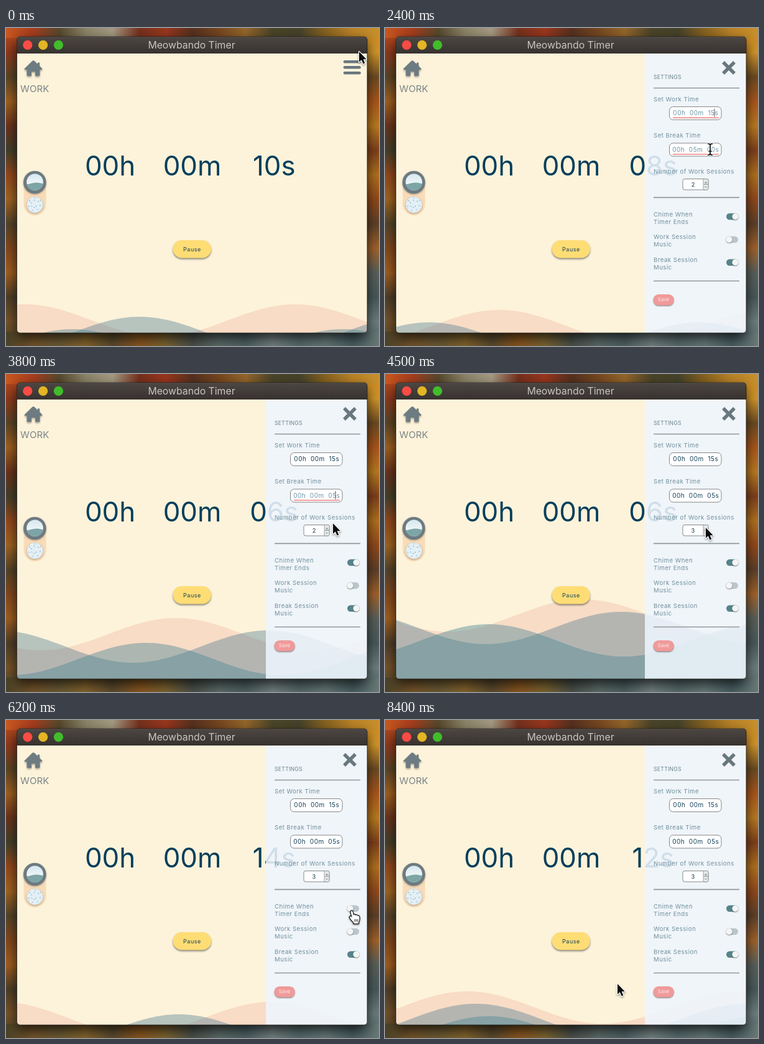
An HTML page with a canvas for the animation above (8500 ms loop, 600 by 511 pixels).

```html
<!DOCTYPE html>
<html lang="en">
<head>
<meta charset="utf-8">
<title>Meowbando Timer</title>
<style>
  html, body { margin: 0; width: 100%; height: 100%; overflow: hidden; background: #33302a; }
  canvas { display: block; width: 100vw; height: 100vh; }
</style>
</head>
<body>
<canvas id="stage" width="600" height="511"></canvas>
<script>
const LOOP = 8500, STEP = 100, TAU = Math.PI * 2;
const WIN = { x: 17.5, y: 14, w: 563.5, h: 476 };
const stage = document.getElementById('stage');
let g = stage.getContext('2d');

// ---------- helpers ----------
function box(x, y, w, h, r, fill, stroke, lineWidth = 1) {
  g.beginPath();
  g.roundRect(x, y, w, h, r);
  if (fill) { g.fillStyle = fill; g.fill(); }
  if (stroke) { g.strokeStyle = stroke; g.lineWidth = lineWidth; g.stroke(); }
}

function disc(x, y, r, fill) {
  g.beginPath();
  g.arc(x, y, r, 0, TAU);
  g.fillStyle = fill;
  g.fill();
}

function line(x1, y1, x2, y2, color, width, cap = 'butt') {
  g.beginPath();
  g.moveTo(x1, y1);
  g.lineTo(x2, y2);
  g.strokeStyle = color;
  g.lineWidth = width;
  g.lineCap = cap;
  g.stroke();
}

function text(str, x, y, size, color, { align = 'left', spacing = 0, weight = 400 } = {}) {
  g.font = `${weight} ${size}px Inter, sans-serif`;
  g.letterSpacing = spacing + 'px';
  g.textAlign = align;
  g.fillStyle = color;
  g.fillText(str, x, y);
}

function shadowed(color, blur, dy, draw) {
  g.save();
  g.shadowColor = color;
  g.shadowBlur = blur;
  g.shadowOffsetY = dy;
  draw();
  g.restore();
}

function gradient(x1, y1, x2, y2, colors) {
  const ramp = g.createLinearGradient(x1, y1, x2, y2);
  colors.forEach((color, i) => ramp.addColorStop(i / (colors.length - 1), color));
  return ramp;
}

// Interpolates rows of [time, ...values].
function track(keys, t, ease = k => k) {
  const i = keys.findIndex(k => k[0] > t);
  if (i < 0) return keys[keys.length - 1].slice(1);
  if (i === 0) return keys[0].slice(1);
  const a = keys[i - 1], b = keys[i];
  const k = ease((t - a[0]) / (b[0] - a[0]));
  return a.slice(1).map((v, n) => v + (b[n + 1] - v) * k);
}

// Latest value whose start time has passed.
const pick = (rows, t) => rows.filter(r => r[0] <= t).pop()[1];
const smooth = k => k * k * (3 - 2 * k);
const clamp = v => Math.max(0, Math.min(1, v));

// ---------- timeline (seconds) ----------
const SECONDS = [[0, '10s'], [.6, '09s'], [1.6, '08s'], [2.6, '07s'], [3.6, '06s'],
  [4.6, '05s'], [4.9, '15s'], [5.6, '14s'], [6.6, '13s'], [7.6, '12s']];
const LEVEL = [[0, 444], [.5, 470], [.9, 479], [1.5, 490], [2.4, 453], [3.8, 392], [4.9, 345],
  [5.3, 357], [6.2, 453], [6.6, 478], [7.4, 468], [8.4, 436], [8.5, 434]];
const FRONT_CREST = [[0, 542], [3.8, 225], [5.3, 100], [8.5, -280]];
const POINTER = [[0, 568, 38], [.2, 557, 62], [.4, 557, 62], [.8, 520, 143], [1.9, 520, 143],
  [2.3, 523, 195], [3.4, 526, 195], [3.8, 526, 240], [4.2, 516, 247], [4.6, 516, 247],
  [5.2, 555, 308], [6.2, 556, 307], [7.4, 556, 307], [8.3, 374, 424]];
const POINTER_KIND = [[0, 'arrow'], [.2, 'hand'], [.6, 'beam'], [3.6, 'arrow'], [5.1, 'hand'], [7.6, 'arrow']];
const OPEN_AT = .3;

// ---------- backdrop ----------
function paintBackdrop() {
  const layer = document.createElement('canvas');
  layer.width = 600;
  layer.height = 511;
  g = layer.getContext('2d');
  const strip = (x, y, w, h, colors) => {
    g.fillStyle = gradient(x, y, w > h ? x + w : x, w > h ? y : y + h, colors.split(' '));
    g.fillRect(x, y, w, h);
  };
  strip(0, 0, 300, 511, '#c04c1c #8f3a1c #5a4526 #a0601f #6a341c #44402a #94481c #a06420 #54442a #84481c #a05e20 #4e3e28 #75532a #4a4228');
  strip(300, 0, 300, 511, '#c9851f #d0952a #6a4a22 #a9551b #b87a20 #7d3f1b #b0701e #90481b #5c4029 #a0622b #59605a #48585a #6c7d7e #526467');
  strip(0, 0, 600, 16, '#c8581f #a83d1d #56482c #8a8368 #a59a82 #74301d #9a361d #55301f #75461f #94662a #4b4428 #44422a #86621f #b98227 #c8902b');
  strip(0, 488, 600, 23, '#4a4228 #74542a #6b5a34 #84642c #5a4a2e #8a561f #7c6430 #4a504a #5c6b69 #4d6062 #748080 #566a6c #667877 #485e62 #687876');
  shadowed('rgba(0,0,0,.75)', 20, 8, () => box(WIN.x, WIN.y, WIN.w, WIN.h, 5, '#222'));
  g = stage.getContext('2d');
  return layer;
}

// ---------- main view ----------
function wave(peakX, peakY, color) {
  g.beginPath();
  g.moveTo(0, 511);
  for (let x = 0; x <= 600; x += 4) {
    g.lineTo(x, peakY + 26 * (1 - Math.cos((x - peakX) / 435 * TAU)));
  }
  g.lineTo(600, 511);
  g.fillStyle = color;
  g.fill();
}

function titleBar() {
  g.fillStyle = gradient(0, 14, 0, 41, ['#4d4744', '#37322f']);
  g.fillRect(17, 14, 565, 27);
  line(17, 14.5, 582, 14.5, '#6b6562', 1);
  ['#fb4b45', '#e2b624', '#41bd2c'].forEach((color, i) => disc(34.8 + i * 24.8, 27.3, 7.6, color));
  text('Meowbando Timer', 298.5, 33.3, 15.8, '#c9c5c2', { align: 'center' });
}

function homeIcon() {
  shadowed('rgba(0,0,0,.35)', 3, 2, () => {
    g.fillStyle = '#6d7b82';
    g.fill(new Path2D('M29.5 65.5 L42.3 53 Q44 51.5 45.7 53 L51 58 V55.5 H54 V61 L58.5 65.5 Q58.5 67 57 67 H54.5 V75.5 Q54.5 77 53 77 H47 V70 H41 V77 H35 Q33.5 77 33.5 75.5 V67 H31 Q29.5 67 29.5 65.5 Z'));
  });
  text('WORK', 23, 102.8, 15, '#7c8387', { spacing: .1 });
}

function themeSwitch() {
  box(28.5, 231, 36, 70, 18, '#f8dcb9');
  shadowed('rgba(0,0,0,.35)', 3, 1, () => disc(46.3, 248, 18.3, '#6d7a81'));
  disc(46.5, 247.5, 13.3, gradient(0, 234, 0, 252, ['#d5e8f0', '#f1f7f8']));
  g.save();
  g.beginPath();
  g.arc(46.5, 247.5, 13.3, 0, TAU);
  g.clip();
  g.beginPath();
  g.moveTo(32, 251);
  g.bezierCurveTo(39, 252, 46, 245, 61, 251);
  g.lineTo(61, 262);
  g.lineTo(32, 262);
  g.fillStyle = '#7da5a6';
  g.fill();
  g.restore();
  shadowed('rgba(0,0,0,.3)', 3, 1, () => disc(46.5, 284, 13, '#dfedf4'));
  for (let i = 1; i < 42; i++) {
    const r = 12 * Math.sqrt(i / 42), a = i * 2.4;
    disc(46.5 + r * Math.cos(a), 284 + r * Math.sin(a), .7, i % 3 ? '#ffffff' : '#7599ad');
  }
}

function pauseButton() {
  shadowed('rgba(40,40,40,.55)', 3, 2, () => box(268.5, 341, 61.5, 28.5, 14.2, '#ffdd75'));
  text('Pause', 299.4, 358.7, 9, '#134258', { align: 'center', spacing: .5 });
}

// ---------- settings ----------
function timeField(y, value, active, caret) {
  box(457.5, y + .5, 83.5, 21, 6, '#fff', '#858789');
  text(value, 499.8, y + 14.3, 10, active ? '#6b95a8' : '#123f58', { align: 'center', spacing: .5 });
  if (active) line(463, y + 18.4, 537, y + 18.4, '#ee6a68', 1.3);
  if (caret) line(530, y + 3.5, 530, y + 17, '#555', 1);
}

function toggle(y, on) {
  box(549, y - 5.2, 19, 10.4, 5.2, on ? '#55848a' : '#bac6ca');
  shadowed('rgba(0,0,0,.5)', 2, .7, () => disc(on ? 563.3 : 553.7, y, 5, '#f4f5f5'));
}

function settings(t) {
  const label = (str, y) => text(str, 432, y, 9.6, '#6f8f9d', { spacing: .5 });
  g.save();
  g.translate(163 * (1 - smooth(clamp((t - OPEN_AT) / .3))), 0);
  g.fillStyle = 'rgba(238,246,254,.87)';
  g.fillRect(418, 41, 164, 450);
  text('SETTINGS', 432, 82, 8.6, '#66808b', { spacing: .3 });
  [96.5, 272.3, 406.5].forEach(y => line(432, y, 570, y, '#92979a', 1.7));

  label('Set Work Time', 118);
  timeField(126, `00h  00m  ${t < 1.5 ? '10' : '15'}s`, t > .7 && t < 2.6, t > 1.1 && t < 2.6);
  label('Set Break Time', 176);
  timeField(184.5, t < 3.1 ? '00h  05m  00s' : '00h  00m  05s', t > 2.2 && t < 4.2, t >= 2.6 && t < 4.2);

  label('Number of Work Sessions', 234.3);
  box(479, 242.5, 41, 17.5, 3, '#fff', '#85898b');
  text(t < 4.4 ? '2' : '3', 495.5, 254.8, 9.4, '#123f58', { align: 'center' });
  [242.5, 251.3].forEach((y, i) => {
    box(512, y, 8, 8.7, 1, '#e5e8e9', '#8c9092', .8);
    text(i ? '–' : '+', 516, y + 7, 7, '#555', { align: 'center' });
  });

  label('Chime When', 303);
  label('Timer Ends', 315);
  label('Work Session', 339);
  label('Music', 351);
  label('Break Session', 376);
  label('Music', 388);
  toggle(303, t < 5.7 || t >= 7);
  toggle(340, false);
  toggle(376.7, true);

  shadowed('rgba(60,40,40,.5)', 2, 1.5, () => box(431.5, 428, 33.3, 17.5, 8.7, '#f09a9a'));
  text('Save', 448.2, 439.3, 7.6, '#fdebeb', { align: 'center', spacing: .3 });
  g.restore();
}

function menuIcon(open) {
  const color = '#69777e';
  if (open) {
    line(544, 55, 562, 73, color, 5.4);
    line(562, 55, 544, 73, color, 5.4);
  } else {
    [54.3, 63.3, 72.3].forEach(y => line(545, y, 568.5, y, color, 4.6, 'round'));
  }
}

// ---------- pointer ----------
const ARROW = new Path2D('M0 0 V16.8 L3.8 13.2 L6.5 19.6 L9.3 18.4 L6.7 12.2 H11.8 Z');
const HAND = new Path2D('M-1.5 1.5 Q-1.5 -.2 0 -.2 Q1.4 -.2 1.7 1.3 L3 7 Q3.4 5.5 5 5.8 Q6 6 6.3 7.2 Q7 6 8.3 6.6 Q9.2 7 9.4 8 Q10.4 7 11.6 8 Q12.6 9 12.6 11 Q12.8 15 11 17.5 V20 H3.2 V18 Q0 15.5 -2.5 11.5 Q-4 9.3 -2.6 8.6 Q-1.3 8.1 .6 10.3 Z');
const BEAM = new Path2D('M-3.5 -9 Q0 -9 0 -6.5 Q0 -9 3.5 -9 M0 -6.5 V6.5 M-3.5 9 Q0 9 0 6.5 Q0 9 3.5 9 M-2 3 H2');

function pointer(t) {
  const [x, y] = track(POINTER, t, smooth);
  const kind = pick(POINTER_KIND, t);
  g.save();
  g.translate(x, y);
  g.lineCap = g.lineJoin = 'round';
  const outline = (path, color, width) => {
    g.strokeStyle = color;
    g.lineWidth = width;
    g.stroke(path);
  };
  if (kind === 'beam') {
    outline(BEAM, '#fff', 3.5);
    outline(BEAM, '#111', 1.7);
  } else {
    const path = kind === 'hand' ? HAND : ARROW;
    shadowed('rgba(0,0,0,.4)', 3, 1.5, () => outline(path, kind === 'hand' ? '#111' : '#fff', 2.4));
    g.fillStyle = kind === 'hand' ? '#fff' : '#0b0b0b';
    g.fill(path);
    if (kind === 'hand') [5, 7.3, 9.6].forEach(px => line(px, 13, px, 17, '#111', .9));
  }
  g.restore();
}

// ---------- frame ----------
const backdrop = paintBackdrop();

function draw(t) {
  g.drawImage(backdrop, 0, 0);
  g.save();
  g.beginPath();
  g.roundRect(WIN.x, WIN.y, WIN.w, WIN.h, 5);
  g.clip();
  g.fillStyle = '#fdf3da';
  g.fillRect(0, 0, 600, 511);

  const [level] = track(LEVEL, t);
  const [frontCrest] = track(FRONT_CREST, t);
  wave(30 + 64 * t, level, 'rgba(238,182,162,.38)');
  wave(215 - 60 * t, level + 20, 'rgba(90,130,150,.43)');
  wave(frontCrest, level + 40, 'rgba(80,135,148,.45)');

  homeIcon();
  themeSwitch();
  [['00h', 167.5], ['00m', 299.5], [pick(SECONDS, t), 431.3]].forEach(([str, x]) =>
    text(str, x, 237, 43.8, '#063f5c', { align: 'center' }));
  pauseButton();

  const open = t >= OPEN_AT;
  if (open) settings(t);
  menuIcon(open);
  titleBar();
  g.restore();
  box(WIN.x, WIN.y, WIN.w, WIN.h, 5, null, 'rgba(20,18,16,.7)');
  pointer(t);
}

function tick() {
  const ms = performance.now() % LOOP;
  draw(Math.floor(ms / STEP) * STEP / 1000);
  requestAnimationFrame(tick);
}
tick();
</script>
</body>
</html>
```
